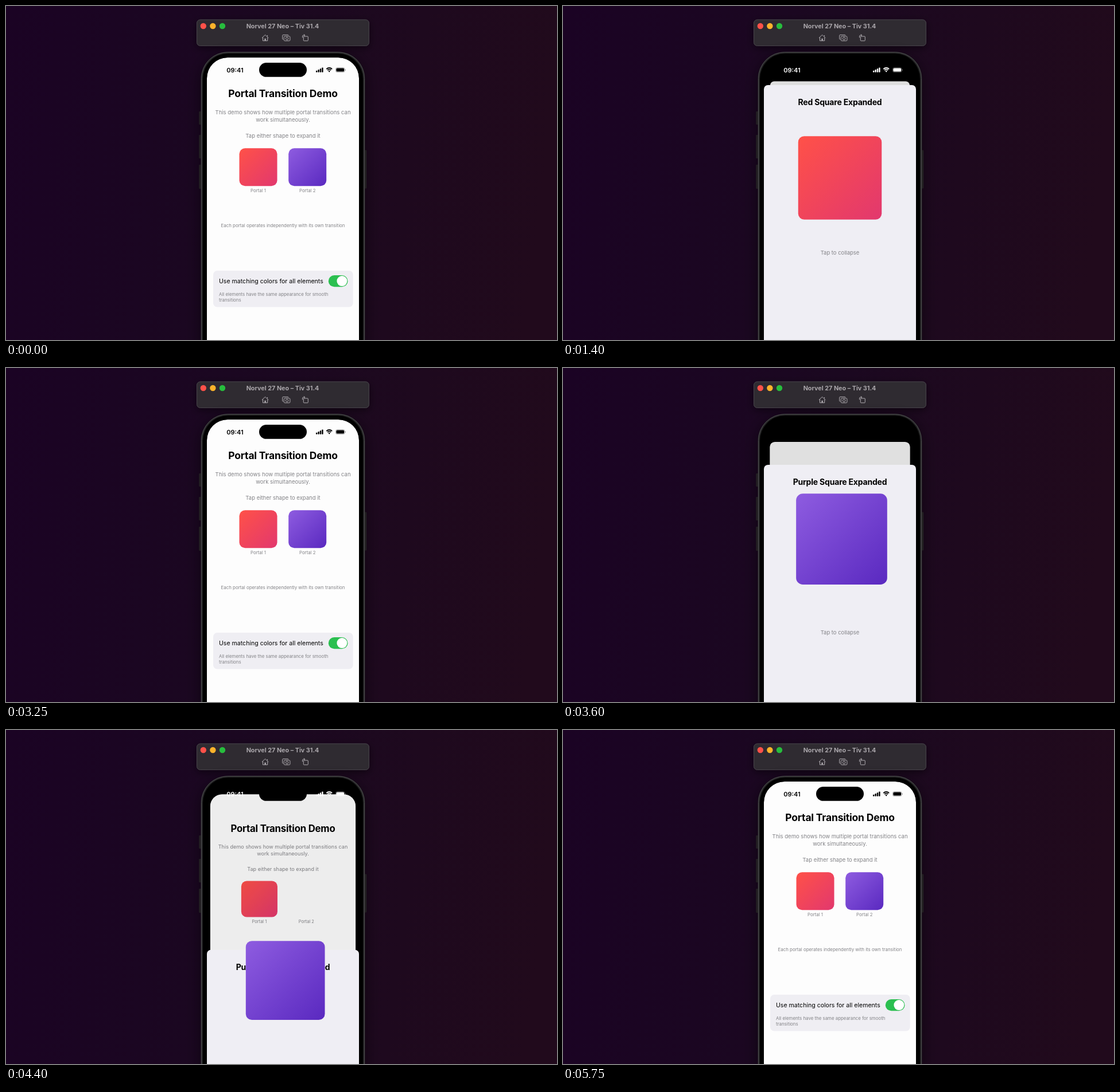
An HTML page with a canvas that plays this animation: 960x583 px, repeating every 5850 ms.

```html
<!DOCTYPE html>
<html lang="en">
<head>
<meta charset="utf-8">
<title>Portal transition</title>
<style>
html, body { margin: 0; width: 100%; height: 100%; overflow: hidden; background: #1c0720; }
canvas { display: block; }
</style>
</head>
<body>
<canvas id="stage" width="960" height="583"></canvas>
<script>
const c = document.getElementById('stage').getContext('2d');
const LOOP = 5850, STEP = 50, MID = 482.5;
const SCREEN_TOP = 90, SHEET_TOP = 138, SHEET_TRAVEL = 528;
const GREY = '#838387';

const tiles = [
  { label: 'Portal 1', title: 'Red Square Expanded', x: 439.5, from: '#ff5148', to: '#e2386e',
    open: 515, launch: 615, close: 2090, back: 2098, drop: 0 },
  { label: 'Portal 2', title: 'Purple Square Expanded', x: 525.2, from: '#8e5ce0', to: '#5a29c0',
    open: 3310, launch: 3410, close: 4300, back: 4368, drop: 154 }
];

const clamp = v => Math.min(1, Math.max(0, v));
const mix = (a, b, k) => a + (b - a) * k;

// Critically damped spring for the sheet, bouncy one for the flying tile
function glide(ms) {
  const x = Math.max(0, ms) * 0.0157;
  return 1 - (1 + x) * Math.exp(-x);
}
function bounce(ms) {
  const x = Math.max(0, ms) * 0.0157, z = 0.75, d = Math.sqrt(1 - z * z);
  return 1 - Math.exp(-z * x) * (Math.cos(d * x) + z / d * Math.sin(d * x));
}

function box(x, y, w, h, r, fill) {
  c.beginPath();
  c.roundRect(x, y, w, h, r);
  if (fill) { c.fillStyle = fill; c.fill(); }
}
function dot(x, y, r, fill) {
  c.beginPath();
  c.arc(x, y, r, 0, 7);
  c.fillStyle = fill;
  c.fill();
}
function text(str, x, y, size, color, weight = 400, align = 'center', spacing = 0) {
  c.font = `${weight} ${size}px Inter, "Liberation Sans", sans-serif`;
  c.textAlign = align;
  c.letterSpacing = spacing + 'px';
  c.fillStyle = color;
  c.fillText(str, x, y);
}
function shadow(blur, alpha) {
  c.shadowBlur = blur;
  c.shadowOffsetY = blur / 4;
  c.shadowColor = `rgba(0,0,0,${alpha})`;
}
function tile(item, x, y, size, r) {
  const h = size / 2, g = c.createLinearGradient(x - h, y - h, x + h, y + h);
  g.addColorStop(0, item.from);
  g.addColorStop(1, item.to);
  box(x - h, y - h, size, size, r, g);
}

function backdrop() {
  const g = c.createLinearGradient(0, 0, 960, 120);
  g.addColorStop(0, '#1b0324');
  g.addColorStop(0.5, '#1b0820');
  g.addColorStop(1, '#210a1c');
  c.fillStyle = g;
  c.fillRect(0, 0, 960, 583);
}

function toolbar() {
  shadow(14, 0.5);
  box(332, 23.5, 301, 46.5, 6.5, '#2f2b31');
  shadow(0, 0);
  c.lineWidth = 1;
  c.strokeStyle = '#47434a';
  box(332.5, 24, 300, 45.5, 6);
  c.stroke();
  ['#ff5149', '#fdb32b', '#27bd3d'].forEach((color, i) => dot(343.8 + i * 16.6, 35, 5.2, color));
  text('Norvel 27 Neo – Tiv 31.4', 482, 38.5, 10.8, '#aaa6ab', 700);

  c.strokeStyle = '#b2aeb3';
  c.lineWidth = 1;
  c.stroke(new Path2D('M445.8 55.8L451.6 50.4L457.4 55.8M447.5 55V60.7H455.7V55M455.5 53V51'));
  box(450.4, 56.8, 2.4, 4, 0, '#b2aeb3');
  c.stroke(new Path2D('M483.2 58.3H482.6Q481.7 58.3 481.7 57.3V51.5Q481.7 50.4 482.8 50.4H491Q492 50.4 492 51.4'));
  box(484.3, 52.8, 10.6, 8, 1.5);
  c.stroke();
  c.beginPath();
  c.arc(489.6, 56.8, 2.2, 0, 7);
  c.stroke();
  box(518.3, 53, 8, 7.8, 1);
  c.stroke();
  c.stroke(new Path2D('M516.5 55.3V53Q516.5 51 518.5 51H520.5M519 49.2L520.8 51L519 52.8'));
}

function phone() {
  [[184, 23], [225, 41], [277, 42]].forEach(([y, h]) => box(336.3, y, 5, h, 1, '#2d292d'));
  box(623, 251.5, 5.3, 67, 1, '#2d292d');
  shadow(26, 0.5);
  box(339.5, 80, 286, 600, 47, '#222223');
  shadow(0, 0);
  c.lineWidth = 1;
  c.strokeStyle = '#505052';
  box(340.5, 80.7, 284, 600, 46);
  c.stroke();
  box(343, 83, 279, 600, 44, '#000');
}

// Main screen; shrinks and dims as the sheet covers it
function card(p, flying) {
  const s = 1 - 0.083 * p;
  c.save();
  c.translate(MID, SCREEN_TOP + 41.5 * p);
  c.scale(s, s);
  c.translate(-MID, -SCREEN_TOP);
  const r = mix(36, 7, p) / s;
  box(350, 90, 265, 620, r, '#fdfdfd');

  text('Portal Transition Demo', MID, 159.3, 17.5, '#000', 700, 'center', -0.2);
  text('This demo shows how multiple portal transitions can', MID, 189, 9.52, GREY);
  text('work simultaneously.', MID, 202, 9.52, GREY);
  text('Tap either shape to expand it', MID, 230, 9.5, GREY);
  for (const item of tiles) {
    if (item !== flying) tile(item, item.x, 281.3, 66, 10);
    text(item.label, item.x, 324.8, 7.8, GREY);
  }
  text('Each portal operates independently with its own transition', MID, 385.8, 7.9, GREY);

  box(361, 462, 243.7, 63.5, 7, '#efeef3');
  text('Use matching colors for all elements', 371, 484, 10.57, '#000', 400, 'left');
  text('All elements have the same appearance for smooth', 371, 505.6, 7.86, GREY, 400, 'left');
  text('transitions', 371, 516, 7.86, GREY, 400, 'left');
  box(561.8, 470, 33.7, 20.3, 10.15, '#2bbf50');
  dot(585.4, 480.1, 9, '#fff');

  box(350, 90, 265, 620, r, `rgba(0,0,0,${0.12 * p})`);
  c.restore();
}

function sheet(item, p) {
  const top = SHEET_TOP + SHEET_TRAVEL * (1 - p);
  box(350, top, 265, 620, 7, '#efeef4');
  text(item.title, MID, top + 35, 14, '#000', 700, 'center', -0.2);
  text('Tap to collapse', MID, top + 295.8, 9.45, GREY);
}

function statusBar(light) {
  const v = Math.round(255 * light), color = `rgb(${v},${v},${v})`;
  box(441, 99, 83, 24.8, 12.4, '#000');
  text('09:41', 399, 115.6, 11, color, 600);
  for (let i = 0; i < 4; i++) {
    const h = 3 + i * 1.75;
    box(540 + i * 3.4, 115.8 - h, 2.4, h, 0.7, color);
  }
  c.strokeStyle = color;
  c.lineWidth = 1.8;
  for (const r of [4.2, 7]) {
    c.beginPath();
    c.arc(563.2, 115, r, -Math.PI * 0.75, -Math.PI * 0.25);
    c.stroke();
  }
  c.beginPath();
  c.moveTo(563.2, 115.8);
  c.arc(563.2, 115.2, 2.4, -Math.PI * 0.75, -Math.PI * 0.25);
  c.fillStyle = color;
  c.fill();
  c.globalAlpha = 0.4;
  c.lineWidth = 0.7;
  box(574.4, 107.6, 15.8, 8, 2.6);
  c.stroke();
  box(590.9, 110.3, 0.9, 2.6, 0.4, color);
  c.globalAlpha = 1;
  box(575.4, 108.6, 13.8, 6, 1.7, color);
}

function fly(item, t) {
  const k = bounce(t - item.launch) - bounce(t - item.back);
  const swell = 1 + 0.134 * Math.sin(Math.PI * clamp((t - item.launch) / 400));
  const sag = Math.min(item.drop, SHEET_TRAVEL * glide(t - item.close));
  tile(item, mix(item.x, MID, k), mix(281.3, 300 + sag, k), mix(66, 145.5, k) * swell, 10.5 * swell);
}

function draw(t) {
  const item = t < 3150 ? tiles[0] : tiles[1];
  const p = glide(t - item.open) - glide(t - item.close);
  const flying = t > item.launch && t < item.back + 600 ? item : null;
  const light = clamp((t - item.open - 420) / 150) - clamp((t - item.close - 180) / 150);

  backdrop();
  toolbar();
  phone();
  c.save();
  box(350, 90, 265, 620, 36);
  c.clip();
  card(p, flying);
  if (p > 0.001) sheet(item, p);
  if (flying) fly(item, t);
  statusBar(light);
  c.restore();
}

function tick() {
  draw(Math.floor(performance.now() % LOOP / STEP) * STEP);
  requestAnimationFrame(tick);
}
tick();
</script>
</body>
</html>
```
